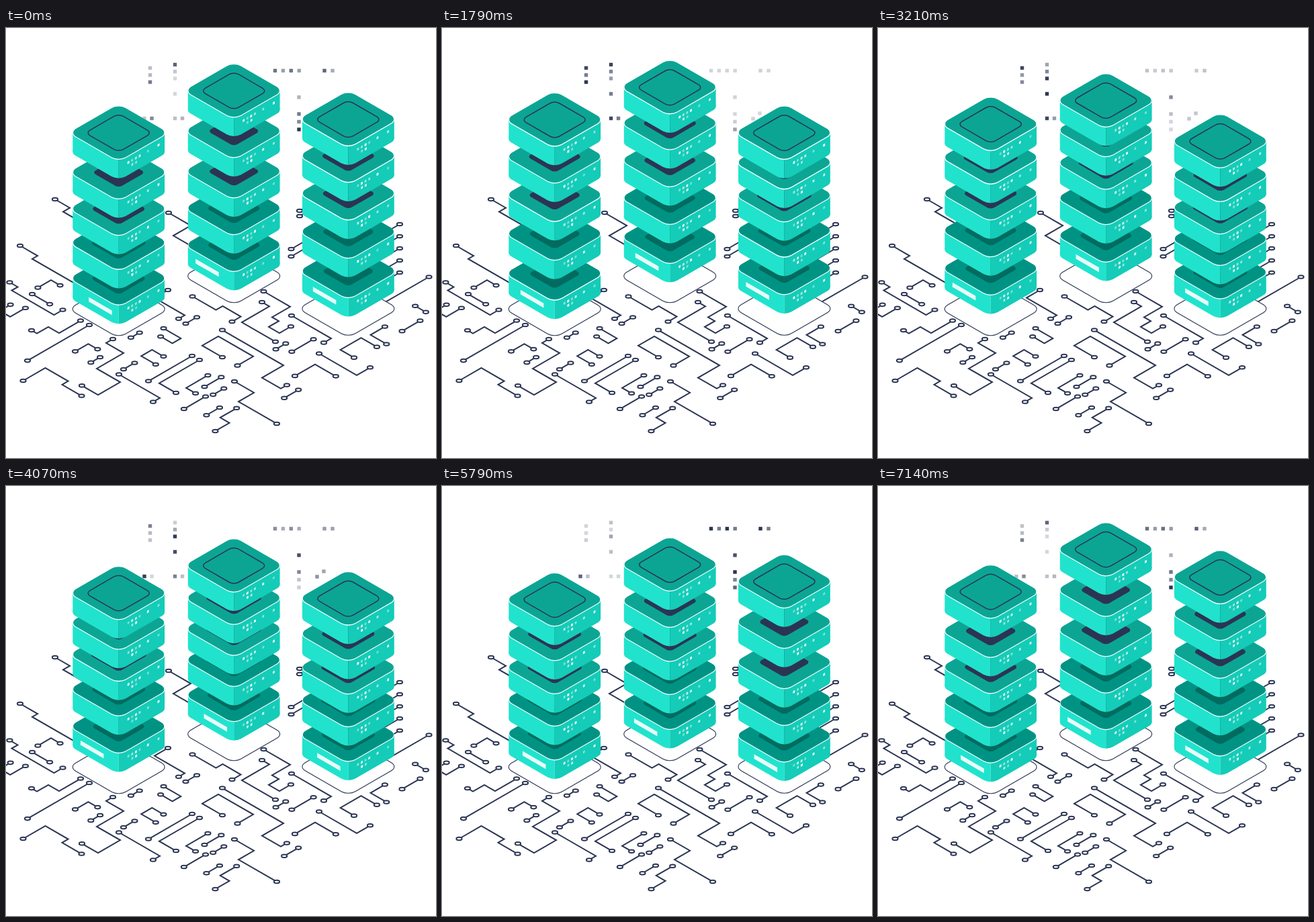
An HTML page with a canvas for the animation above (7.21 s loop, 640 by 640 pixels).

```html
<!DOCTYPE html>
<html lang="en">
<head>
<meta charset="utf-8">
<title>Server towers</title>
<style>
  html, body { margin: 0; width: 100%; height: 100%; overflow: hidden; background: #fff; }
  canvas { display: block; width: 640px; height: 640px; }
</style>
</head>
<body>
<canvas width="640" height="640"></canvas>
<script>
const ctx = document.querySelector('canvas').getContext('2d');
const LOOP = 7210;
const SLOPE = Math.tan(Math.PI / 6);
const NAVY = '#2b3553';
const BOX_HEIGHT = 28;
const PHASE_STEP = 21;

// Phases are in degrees of the loop
const towers = [
  { x: 167.7, y: 0, phase: 97, barPhase: 179 },
  { x: 339.2, y: -49, phase: 61, barPhase: 3 },
  { x: 509.4, y: -.5, phase: -9, barPhase: 79 }
];
// Highest centre of each box and how far it sinks, from the top down
const rest = [136.6, 190.8, 246, 301.3, 357.9];
const travel = [32.7, 29.8, 24.8, 18.8, 14.8];

let seed = 7;
function random(min, max) {
  seed = (seed * 16807) % 2147483647;
  return min + (max - min) * seed / 2147483647;
}

// 0 to 1 and back once per loop, eased at both ends
function wave(angle, phase) {
  const turn = (((angle - phase) / 360) % 1 + 1) % 1;
  const u = 2 * Math.min(turn, 1 - turn);
  return u < .5 ? .5 * (2 * u) ** 2.6 : 1 - .5 * (2 - 2 * u) ** 2.6;
}

function glow(angle, peak) {
  return (.5 + .5 * Math.cos((angle - peak) * Math.PI / 180)) ** 1.25;
}

// --- Circuit traces ---

const traces = [];

// Horizontal steps alternate between the falling and the rising axis
function trace(x, y, ...steps) {
  const points = [[x, y]];
  steps.forEach((dx, i) => {
    x += dx;
    y += dx * (i % 2 ? -SLOPE : SLOPE);
    points.push([x, y]);
  });
  return points;
}

function addTrace(...args) {
  traces.push(trace(...args));
}

function samples(points) {
  return points.slice(1).flatMap(([x, y], i) => {
    const [px, py] = points[i];
    const count = Math.max(1, Math.ceil(Math.abs(x - px) / 4));
    return Array.from({ length: count + 1 }, (_, k) =>
      [px + (x - px) * k / count, py + (y - py) * k / count]);
  });
}

function onFreeFloor([x, y]) {
  const inside = Math.abs(x - 320) / 330 + Math.abs(y - 420) / 185 < 1.05;
  return inside && towers.every(tower => {
    const dx = Math.abs(x - tower.x);
    return dx > 76 || y > 470 + tower.y - dx * SLOPE;
  });
}

// The long traces that shape the floor
addTrace(73, 255, 22, -10, 55);
addTrace(21, 324, 26, -8, 95);
addTrace(5.5, 378.5, 12, -9, 63, 13);
addTrace(38, 450, 8, 17, 16, 32);
addTrace(124, 442, 0, -92);
addTrace(159, 463, 0, -10, 26, -40, 35, -33, -24);
addTrace(25.5, 525, 0, 33, 34, -9, 29);
addTrace(168, 515.5, 61, -10);
addTrace(277, 488, 0, -65);
addTrace(288, 494, 0, -60, 25);
addTrace(322, 490, -30, 24, 52, -23.5);
addTrace(418, 531.5, 0, -9, -28, 32, -91);
addTrace(340, 526, 29, -23, 57);
addTrace(383.5, 392, 39.5, -27, 10, -15, 16, 17);
addTrace(381, 408, 11, -41, 50);
addTrace(277.5, 399.5, 35, 10, 27, -13);
addTrace(242, 275, 33, -26, 55);
addTrace(241, 390, 0, -20, 45, -9);
addTrace(466, 484.5, 56, 20);
addTrace(629.5, 370.5, 0, -90);
addTrace(425, 428, 59, -11);

// Stubs that run in under the right-hand tower
for (let i = 0; i < 2; i++) {
  addTrace(437, 272 + 8 * i, 0, 40);
  addTrace(424.5, 329 + 11 * i, 0, 50);
}
for (let i = 0; i < 5; i++) addTrace(586, 292 + 18 * i, 0, -50);

// Short traces scattered over the space that is left
const occupied = traces.flatMap(samples);
for (let attempt = 0, added = 0; attempt < 5000 && added < 24; attempt++) {
  const steps = Array.from({ length: 1 + Math.floor(random(0, 3)) },
    () => random(12, 34) * (random(0, 1) < .5 ? -1 : 1));
  if (random(0, 1) < .5) steps.unshift(0);
  const points = trace(random(20, 620), random(330, 580), ...steps);
  const own = samples(points);
  const free = own.every(p => onFreeFloor(p) &&
    occupied.every(q => Math.hypot(p[0] - q[0], p[1] - q[1]) > 10));
  if (free) {
    traces.push(points);
    occupied.push(...own);
    added++;
  }
}

function drawTraces() {
  ctx.strokeStyle = NAVY;
  ctx.lineWidth = 2;
  ctx.fillStyle = '#fff';
  for (const points of traces) {
    ctx.beginPath();
    points.forEach(p => ctx.lineTo(...p));
    ctx.stroke();
    for (const [x, y] of [points[0], points.at(-1)]) {
      ctx.beginPath();
      ctx.ellipse(x, y, 4.1, 2.3, 0, 0, 2 * Math.PI);
      ctx.fill();
      ctx.stroke();
    }
  }
}

// --- Blinking pixels ---

function pixelRun(angle, x, y, dx, dy, count, peak, lag = 0) {
  ctx.fillStyle = NAVY;
  for (let i = 0; i < count; i++) {
    ctx.globalAlpha = .2 + (i % 2 ? .45 : .8) * glow(angle, peak + i * lag);
    ctx.fillRect(x + i * dx - 2.7, y + i * dy - 2.7, 5.4, 5.4);
  }
  ctx.globalAlpha = 1;
}

function drawPixels(angle) {
  pixelRun(angle, 214.5, 59.5, 0, 10.5, 3, 125, -25);
  pixelRun(angle, 251.5, 54.5, 0, 10.3, 3, 58, 64);
  pixelRun(angle, 251.5, 98, 0, 0, 1, 165);
  pixelRun(angle, 206, 134.5, 11, 0, 2, 230, 170);
  pixelRun(angle, 251.5, 134.5, 11, 0, 2, 125, -30);
  pixelRun(angle, 400.5, 63.5, 11.9, 0, 4, 290);
  pixelRun(angle, 474, 63.5, 12, 0, 2, 300, -25);
  pixelRun(angle, 436, 103, 0, 0, 1, 245);
  pixelRun(angle, 436, 128, 0, 11.5, 3, 285, 32);
  pixelRun(angle, 463, 135, 10, -8, 2, 295, -15);
}

// --- Towers ---

// Rounded isometric square reaching halfHeight above and below its centre
function tile(x, y, halfHeight, radius) {
  const s = halfHeight + radius * (1 - Math.SQRT1_2);
  ctx.save();
  ctx.transform(Math.sqrt(3) / 2, .5, -Math.sqrt(3) / 2, .5, x, y);
  ctx.beginPath();
  ctx.roundRect(-s, -s, 2 * s, 2 * s, radius);
  ctx.restore();
}

function fillTile(color, ...shape) {
  tile(...shape);
  ctx.fillStyle = color;
  ctx.fill();
}

function strokeTile(width, ...shape) {
  tile(...shape);
  ctx.strokeStyle = NAVY;
  ctx.lineWidth = width;
  ctx.stroke();
}

function skewedRect(x, y, w, h, slope) {
  ctx.beginPath();
  ctx.moveTo(x, y);
  ctx.lineTo(x + w, y + w * slope);
  ctx.lineTo(x + w, y + w * slope + h);
  ctx.lineTo(x, y + h);
  ctx.fill();
}

function drawSide(x, y, left, color) {
  ctx.save();
  ctx.beginPath();
  ctx.rect(left, y, 70, 90);
  ctx.clip();
  fillTile(color, x, y + BOX_HEIGHT, 39.5, 12);
  ctx.fillRect(x - 68.4, y, 136.8, BOX_HEIGHT);
  ctx.restore();
}

// Upper row: four close lights and two apart; lower row: two lights
function drawLights(x, y, boxSeed, angle) {
  ctx.fillStyle = '#fff';
  for (let i = 0; i < 8; i++) {
    const lower = i > 5;
    const dx = i < 4 ? 14.5 + 5.6 * i : lower ? 20.3 + 5.7 * (i - 6) : 43.6 + 15.7 * (i - 4);
    const dy = (lower ? 58.8 : 52.4) - dx * SLOPE;
    ctx.globalAlpha = .4 + .6 * glow(angle, boxSeed * 83 + i * 137);
    skewedRect(x + dx - 1.4, y + dy - 1, 2.8, 3.6, -SLOPE);
  }
  ctx.globalAlpha = 1;
}

function drawBox(x, y, level, gap, boxSeed, angle) {
  const upper = level < 3;
  drawSide(x, y, x - 70, '#21e3cd');
  drawSide(x, y, x, '#14ccb8');
  fillTile('#fff', x, y + .5, 39.5, 12);
  fillTile(upper ? '#0ca594' : '#009384', x, y - .3, 39, 12);

  if (level === 0) {
    strokeTile(1.5, x, y, 26.3, 8);
  } else {
    const halfWidth = 40 - .4 * (gap - 50);
    fillTile(upper ? NAVY : '#026b60', x, y, halfWidth * SLOPE, 6);
  }
  drawLights(x, y, boxSeed, angle);
}

function drawTower({ x, y, phase, barPhase }, index, angle) {
  const centres = rest.map((top, i) => y + top + travel[i] * wave(angle, phase + i * PHASE_STEP));
  for (let i = 4; i >= 0; i--) {
    drawBox(x, centres[i], i, centres[i] - centres[i - 1], index * 5 + i, angle);
  }
  const dx = -57 + 12.5 * wave(angle, barPhase);
  ctx.globalAlpha = .9;
  skewedRect(x + dx, centres[4] + 53.5 + dx * SLOPE, 34.5, 6.8, SLOPE);
  ctx.globalAlpha = 1;
}

function draw(now) {
  const angle = (now % LOOP) / LOOP * 360;
  ctx.fillStyle = '#fff';
  ctx.fillRect(0, 0, 640, 640);
  drawPixels(angle);
  drawTraces();
  for (const { x, y } of towers) {
    fillTile('#fff', x, 418.3 + y, 39.5, 12);
    strokeTile(1.1, x, 418.3 + y, 39.5, 12);
  }
  towers.forEach((tower, i) => drawTower(tower, i, angle));
}

const start = performance.now();
function tick() {
  draw(performance.now() - start);
  requestAnimationFrame(tick);
}
tick();
</script>
</body>
</html>
```
